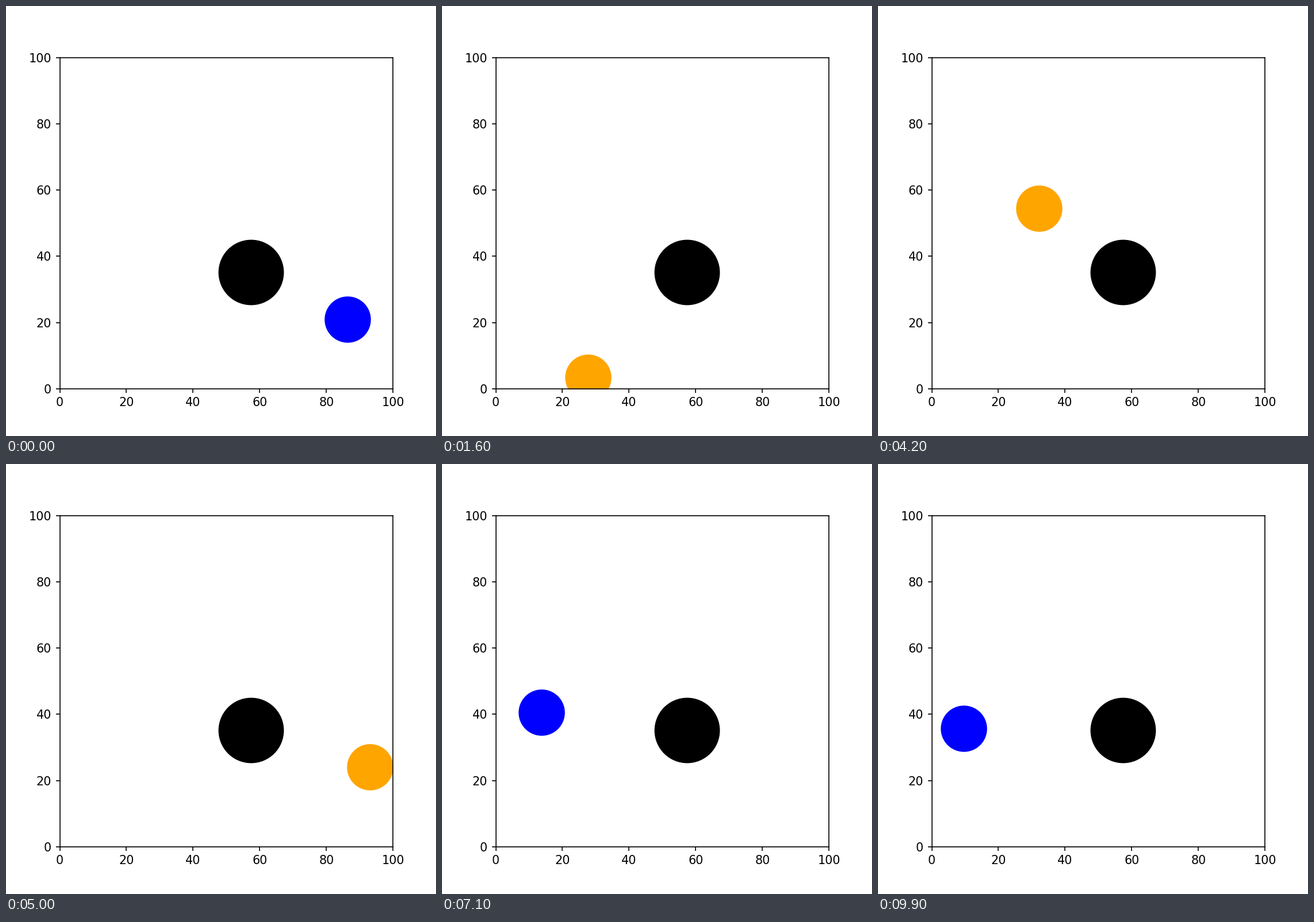
Write a matplotlib script that moves like this. It is 748 px wide and 748 px high and loops after 10000 ms.

```python
import numpy as np
import matplotlib.pyplot as plt
from matplotlib.animation import FuncAnimation

SIZE, INCHES = 748, 5
FRAMES, STEP_MS = 100, 100
SPAN = 100  # side of the wrap-around arena

# Key points (step, x, y) of the walk; x and y are unwrapped
KEYS = np.array([
    (0, 86.4, 21), (6, 60, 56.4), (11, 7, 43.6), (16, 27.7, 103.4),
    (20, -4, 111), (28, -76.35, 124.65), (35, -123, 96), (42, -167.75, 54.4),
    (50, -207, 24), (55, -190, 24), (61, -193.5, 25.6), (70, -186.3, 40),
    (82, -193.5, 36.2), (88, -183, 36), (99, -190.45, 35.65),
])
ORANGE_STEPS = range(8, 52)


def hermite(t, knots, values):
    """Smooth curve through the key points."""
    slope = np.gradient(values, knots)
    i = np.clip(np.searchsorted(knots, t, side="right") - 1, 0, len(knots) - 2)
    h = knots[i + 1] - knots[i]
    u = (t - knots[i]) / h
    v = 1 - u
    return (values[i] * v * v * (1 + 2 * u) + values[i + 1] * u * u * (1 + 2 * v)
            + h * u * v * (slope[i] * v - slope[i + 1] * u))


knots, xs, ys = KEYS.T
steps = np.arange(FRAMES)
path = np.column_stack([hermite(steps, knots, v) for v in (xs, ys)]) % SPAN

fig, ax = plt.subplots(figsize=(INCHES, INCHES), dpi=SIZE / INCHES)
ax.set(xlim=(0, SPAN), ylim=(0, SPAN))
ax.scatter(57.3, 35.2, s=3000, c="black", linewidths=0)
ball = ax.scatter(*path[0], s=1500, c="blue", linewidths=0)


def update(n):
    ball.set_offsets(path[n])
    ball.set_color("orange" if n in ORANGE_STEPS else "blue")
    return (ball,)


anim = FuncAnimation(fig, update, frames=FRAMES, interval=STEP_MS,
                     repeat=True, repeat_delay=0)
plt.show()
```
